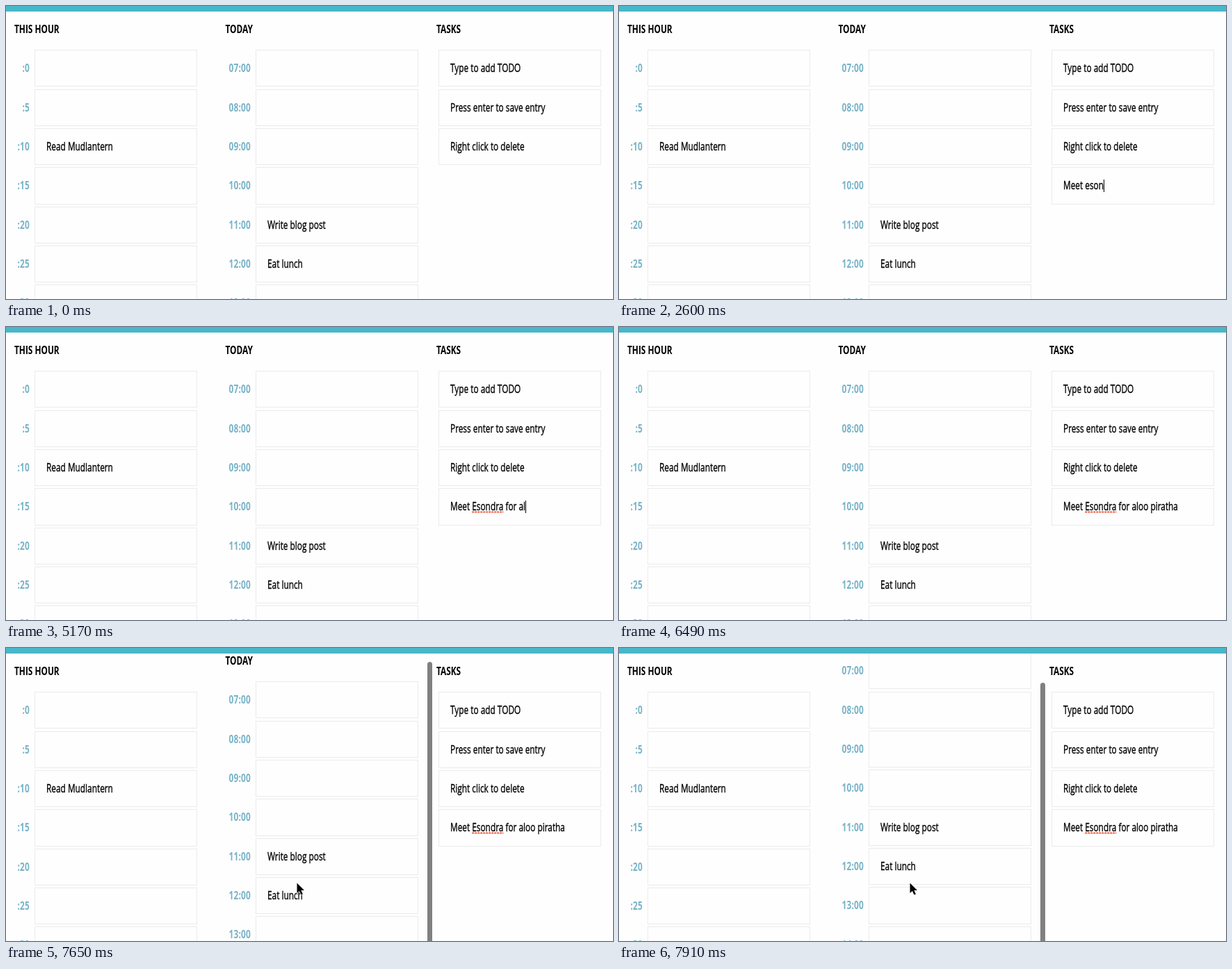
An HTML page that plays this animation: 873x422 px, repeating every 7.99 s.

```html
<!DOCTYPE html>
<html lang="en">
<head>
<meta charset="utf-8">
<title>Day planner</title>
<style>
html, body { margin: 0; width: 100%; height: 100%; overflow: hidden; background: #fefefe; }
svg { display: block; width: 100%; height: 100%; }
text { font: 15.5px "Open Sans", "Noto Sans", sans-serif; white-space: pre; fill: #000; stroke: #000; stroke-width: 0.35; }
.head { font-weight: 700; stroke: none; }
.time { font-weight: 700; letter-spacing: 0.3px; fill: #78b3c7; stroke: none; text-anchor: end; }
.box { fill: #fefefe; stroke: #ebebeb; }
</style>
</head>
<body>
<svg id="stage" viewBox="0 0 873 422"></svg>
<script>
const LOOP = 7990;
const TICK = LOOP / 90; // the screen updates once per tick
const NARROW = 0.765; // one condensed face for all text
const stage = document.getElementById("stage");

const rowTop = i => 63.39 + i * 56.35;
const rowY = i => Math.round(rowTop(i));
const rowHeight = i => Math.round(rowTop(i) + 53.08) - rowY(i);

const label = (x, y, str, cls = "", id = "") =>
  `<text id="${id}" class="${cls}" transform="translate(${x} ${y}) scale(${NARROW} 1)">${str}</text>`;
const box = (x, i) =>
  `<rect class="box" x="${x + 0.5}" y="${rowY(i) + 0.5}" width="233" height="${rowHeight(i) - 1}"/>`;
const entry = (x, i, str = "", id = "") =>
  box(x, i) + label(x + 17, rowY(i) + 32, str, "", id);

function column(headX, title, boxX, timeX, times, entries) {
  return label(headX, 39, title, "head") + times.map((time, i) =>
    label(timeX, rowY(i) + 32, time, "time") + entry(boxX, i, entries[i])).join("");
}

const minutes = Array.from({ length: 7 }, (_, i) => ":" + i * 5);
const hours = Array.from({ length: 8 }, (_, i) => String(i + 7).padStart(2, "0") + ":00");
const tips = ["Type to add TODO", "Press enter to save entry", "Right click to delete"];

stage.innerHTML = `
  <rect width="873" height="422" fill="#fefefe"/>
  ${column(12, "THIS HOUR", 41, 34, minutes, { 2: "Read Mudlantern" })}
  <g id="today">${column(315.5, "TODAY", 359, 352, hours, { 4: "Write blog post", 5: "Eat lunch" })}</g>
  ${label(619, 39, "TASKS", "head")}
  ${tips.map((tip, i) => entry(622, i, tip)).join("")}
  <g id="draft">
    ${entry(622, 3, "", "typed")}
    <path id="squiggle" fill="none" stroke="#f0563c" stroke-width="2" stroke-dasharray="3 1"/>
    <rect id="caret" y="250" width="1" height="18"/>
  </g>
  <rect id="thumb" x="606" width="7" height="600" rx="3.5" fill="#808080"/>
  <rect width="873" height="8" fill="#48b7c9"/>
  <path id="pointer" d="M0 0V14.5L3.4 11.4L6 17L8.4 16L5.9 10.5H10.5Z" stroke="#fff" stroke-width="1.2" paint-order="stroke"/>`;

const [today, draft, typed, squiggle, caret, thumb, pointer] =
  ["today", "draft", "typed", "squiggle", "caret", "thumb", "pointer"].map(id => document.getElementById(id));
const show = (el, on) => el.setAttribute("visibility", on ? "visible" : "hidden");

// One slot per tick between slashes, an empty slot is a pause, "<" is backspace
const keys = "M////e//e/t //e/s//o/n/// ////<//</<//</</E//s//o/n//d/r/a/ /f/o/r// /a/l// ///<//o/o/ /p//i/r/a/t//h/a".split("/");
const TYPE_AT = 9, TYPE_END = 73, MOVE_AT = 81, MOVE_TICKS = 2, SCROLL_AT = 86;

const textAt = tick => keys.slice(0, Math.max(0, tick - TYPE_AT + 1))
  .reduce((str, key) => key === "<" ? str.slice(0, -1) : str + key, "");

function widthOf(str) {
  typed.textContent = str;
  return typed.getComputedTextLength() * NARROW;
}
const nameStart = 639 + widthOf("Meet ");
const nameEnd = 639 + widthOf("Meet Esondra");
squiggle.setAttribute("d", `M${nameStart} 266.5H${nameEnd}`);

function render(t) {
  const tick = Math.floor(t / TICK);

  const str = textAt(tick);
  caret.setAttribute("x", Math.round(639 + widthOf(str)));
  show(draft, tick >= TYPE_AT);
  show(caret, tick >= TYPE_AT && tick < TYPE_END);
  show(squiggle, str.startsWith("Meet Esondra f"));

  // the pointer slows down towards its resting place
  const left = Math.max(0, 1 - (tick - MOVE_AT) / MOVE_TICKS) ** 1.5;
  pointer.setAttribute("transform", `translate(${418.5 + 176 * left} ${338.5 + 67 * left})`);
  show(pointer, tick >= MOVE_AT);

  const scroll = tick < SCROLL_AT ? 0 : 15 + 14 * (tick - SCROLL_AT);
  today.setAttribute("transform", `translate(0 ${-scroll})`);
  thumb.setAttribute("y", Math.round(9.3 + scroll * 0.714));
  show(thumb, scroll > 0);
}

const start = performance.now();
function frame() {
  render((performance.now() - start) % LOOP);
  requestAnimationFrame(frame);
}
frame();
</script>
</body>
</html>
```
